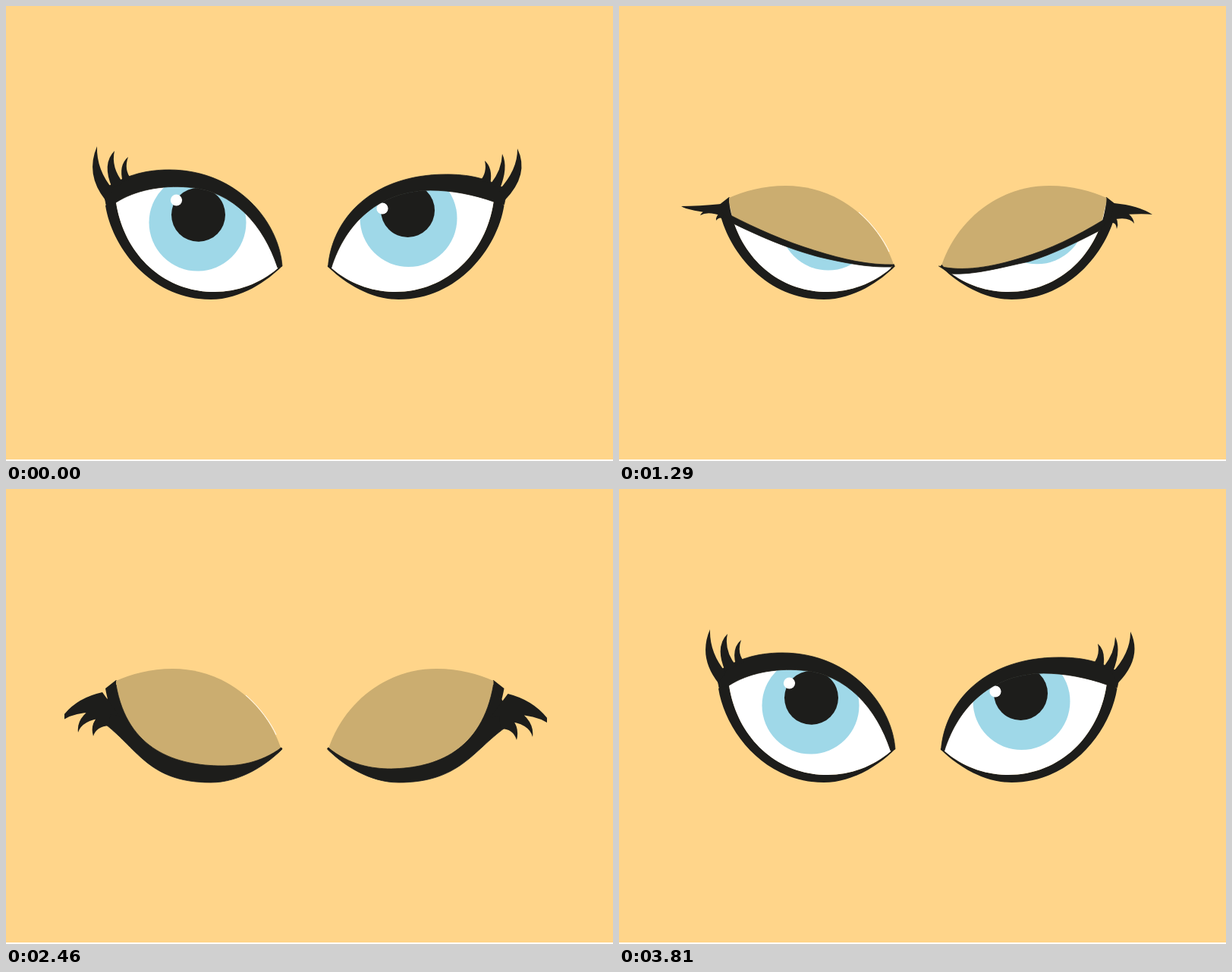
Animation, 800 px wide and 600 px high, one loop 3840 ms. Source, as an HTML page:

```html
<!DOCTYPE html>
<html lang="en">
<head>
<meta charset="utf-8">
<title>Blinking eyes</title>
<style>
  html, body { margin: 0; width: 100%; height: 100%; overflow: hidden; background: #ffd58a; }
  svg { display: block; width: 100vw; height: 100vh; }
  .ink { fill: #1d1d1b; }
  .lid { fill: #1d1d1b; stroke: #1d1d1b; stroke-width: .8; }
  .shadow { fill: #cbad70; }
  .white { fill: #fff; }
  .iris { fill: #9fd8e8; }
  .glint { fill: none; stroke: #fff; }
</style>
</head>
<body>
<svg viewBox="0 0 800 600">
  <defs>
    <clipPath id="lashArea"><rect x="77" y="100" width="636" height="400"/></clipPath>
    <g id="socket">
      <path class="ink" d="M145,252 L131,263 C140,320 192,387 270,387 C310,387 345,362 364,343 L361,340 C330,350 300,365 275,365 C220,365 175,320 150,256 Z"/>
      <path class="shadow" d="M145,253 C165,244 190,237 220,237 C290,237 343,285 362,341 L358,346 C335,366 305,377 275,377 C205,377 155,325 145,259 Z"/>
    </g>
  </defs>
  <rect class="white" y="598" width="800" height="2"/>
  <g id="face" clip-path="url(#lashArea)"></g>
</svg>
<script>
const LOOP = 3840, STEP = 30;
const BLINKS = [30, 1140, 2130, 3240];
const CLOSE = 180, HOLD_END = 390, BLINK_END = 570;
const HALF = 5 / 6; // closure of the middle pose
const LOWER_RIM = 'L358,346 C335,366 305,377 275,377 C205,377 155,325 145,259 Z';

// Each part lists three poses: open, nearly shut, shut.
// "rim" is the lower edge of the upper lid, "brow" its upper edge.
const leftEye = {
  mirror: false,
  glint: 'M356,324 C350,310 334,287 316,272',
  eye: { x: 252.5, y: 285.5, pupil: [1, -10.2], shine: [-28, -29.5], look: [25, -1] },
  rim: [
    'M145,259 C170,243 205,236 240,239 C300,243 340,290 358,345',
    'M151,287 C184,303 222,320 264,331 C298,339 330,345 358,344',
    'M132,311 C175,345 190,387 270,387 C310,387 345,362 364,343'
  ],
  brow: [
    'L364,343 C360,285 305,216 215,216 C180,216 155,225 128,242 L130,252 L132,262 Z',
    'L363,341 C330,342 295,334 260,323 C220,311 180,293 147,276 L144,256 L132,268 Z',
    'L363,341 C335,362 305,365 285,365 C225,365 160,345 145,258 L140,268 L133,278 Z'
  ],
  lashes: [
    'M131,256 Q104,222 120,185 Q119,216 141,242 Z M140,240 Q126,208 143,191 Q138,213 155,234 Z M154,232 Q148,210 161,199 Q155,216 165,228 Z',
    'M135,261 Q105,264 82,264 Q90,270 136,275 Z M134,266 Q112,266 107,276 Q117,270 136,277 Z M136,270 Q127,276 128,283 Q132,277 138,281 Z',
    'M127,268 Q86,277 68,310 Q95,286 150,300 Z M125,283 Q92,298 95,321 Q100,305 128,302 Z M138,290 Q108,302 115,326 Q119,313 136,312 Z'
  ]
};

const rightEye = {
  mirror: true,
  eye: { x: 257, y: 280, pupil: [1, -10.5], shine: [34.5, -13], look: [-22, -4] },
  rim: [
    'M145,258 C170,249 200,243 228,243 C295,244 340,285 359,346',
    'M154,296 C185,312 215,327 247,337 C285,345 320,355 350,353',
    'M130,315 C172,345 190,387 270,387 C310,387 345,362 364,343'
  ],
  brow: [
    'L363,344 C358,280 305,222 207,222 C180,222 155,226 128,242 L129,252 L131,262 Z',
    'L366,343 C335,351 295,344 257,332 C220,321 185,304 149,282 L144,256 L132,270 Z',
    'L363,341 C335,364 305,369 280,369 C220,368 160,345 145,258 L140,268 L133,280 Z'
  ],
  lashes: [
    'M130,256 Q97,222 113.5,188 Q113,216 138,243 Z M137,242 Q125,213 133.5,195 Q134,216 149,235 Z M149,233 Q146,213 156.5,204 Q153,220 163,231 Z',
    'M135,260 Q103,263 84.5,275 Q97,273 138,276 Z M135,266 Q110,272 108.5,287 Q115,277 138,282 Z M138,272 Q127,283 131.5,294 Q132,284 141,286 Z',
    'M126,270 Q86,280 66,314 Q94,290 150,302 Z M125,285 Q90,302 93.5,327 Q98,309 128,306 Z M138,292 Q108,305 114.5,331 Q119,316 136,316 Z'
  ]
};

const clamp = v => Math.min(1, Math.max(0, v));
const smooth = v => v * v * (3 - 2 * v);

function add(parent, tag, attrs = {}) {
  const node = document.createElementNS('http://www.w3.org/2000/svg', tag);
  for (const key in attrs) node.setAttribute(key, attrs[key]);
  return parent.appendChild(node);
}

function mix(from, to, amount) {
  const ends = to.match(/[\d.]+/g);
  let i = 0;
  return from.replace(/[\d.]+/g, n => (+n + (ends[i++] - n) * amount).toFixed(2));
}

function pose(list, shut) {
  return shut < HALF
    ? mix(list[0], list[1], shut / HALF)
    : mix(list[1], list[2], (shut - HALF) / (1 - HALF));
}

function buildEye(data, index) {
  const { eye } = data;
  const root = add(face, 'g', data.mirror ? { transform: 'translate(787.5 0) scale(-1 1)' } : {});
  const clip = add(root, 'clipPath', { id: 'opening' + index });
  const opening = add(clip, 'path');
  add(root, 'use', { href: '#socket' });
  if (data.glint) add(root, 'path', { class: 'glint', d: data.glint });
  const white = add(root, 'path', { class: 'white' });
  const view = add(root, 'g', { 'clip-path': `url(#opening${index})` });
  const ball = add(view, 'g');
  const disc = (name, r, [cx, cy]) => add(ball, 'circle', { class: name, r, cx, cy });
  disc('iris', 64, [0, 0]);
  disc('ink', 35.5, eye.pupil);
  disc('white', 7.6, eye.shine);
  const lid = add(root, 'path', { class: 'lid' });
  const lashes = add(root, 'path', { class: 'ink' });

  return (shut, gaze) => {
    const rim = pose(data.rim, shut);
    const hole = rim + LOWER_RIM;
    opening.setAttribute('d', hole);
    white.setAttribute('d', hole);
    lid.setAttribute('d', rim + pose(data.brow, shut));
    lashes.setAttribute('d', pose(data.lashes, shut));
    const x = eye.x + eye.look[0] * gaze, y = eye.y + eye.look[1] * gaze;
    ball.setAttribute('transform', `translate(${x} ${y})`);
  };
}

function closure(t) {
  return Math.max(...BLINKS.map(start => {
    const age = t - start;
    return clamp(Math.min(age / CLOSE, (BLINK_END - age) / (BLINK_END - HOLD_END)));
  }));
}

// The gaze changes side behind each blink.
function gazeAt(t) {
  return BLINKS.reduce((sum, start, i) =>
    sum + (i % 2 ? -1 : 1) * smooth(clamp((t - start - 90) / 360)), 0);
}

const face = document.getElementById('face');
const eyes = [leftEye, rightEye].map(buildEye);
const begin = performance.now();

function draw() {
  const t = Math.floor((performance.now() - begin) % LOOP / STEP) * STEP;
  const shut = closure(t), gaze = gazeAt(t);
  eyes.forEach(update => update(shut, gaze));
  requestAnimationFrame(draw);
}
draw();
</script>
</body>
</html>
```
